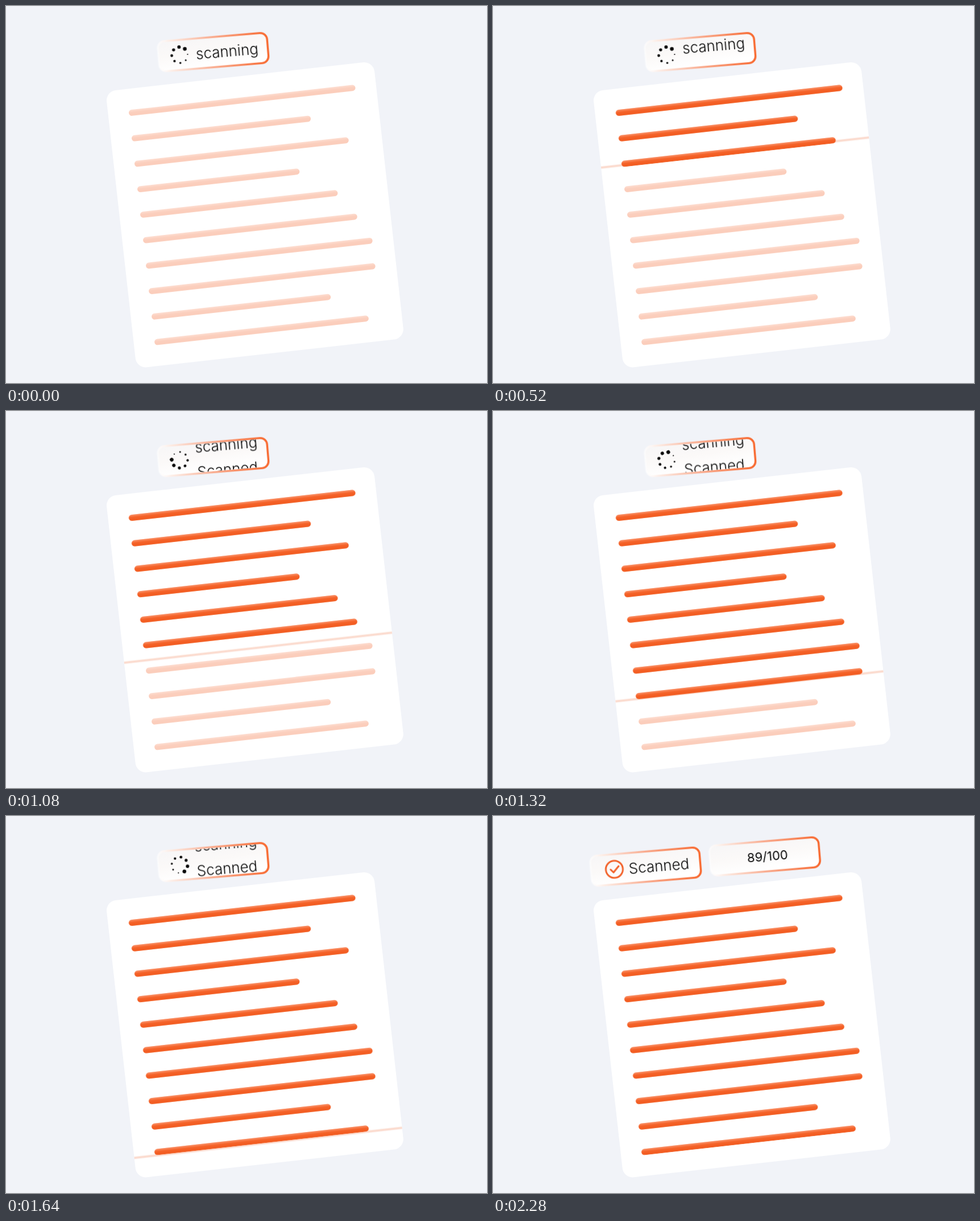
Recreate the animation shown at these times as an HTML page without scripts. Size 846 by 662 pixels, loop 4000 ms.

```html
<!DOCTYPE html>
<html lang="en">
<head>
<meta charset="utf-8">
<title>Document scan</title>
<style>
  html, body { margin: 0; width: 100%; height: 100%; overflow: hidden; background: #f1f3f8; }
  svg { display: block; width: 846px; height: 662px; }
  text { font-family: Inter, "Open Sans", sans-serif; font-size: 26px; font-weight: 300; fill: #0a0a0a; }
  .score { font-size: 22px; font-weight: 400; text-anchor: middle; }
  .pill { fill: url(#glass); stroke: url(#rim); stroke-width: 3.5; }

  .scan, .old, .new, .spin, .dots, .tick, .status, .result {
    animation: 4s linear infinite;
  }
  .scan { animation-name: scan; }
  .old { animation-name: old; }
  .new { animation-name: new; }
  .spin { animation-name: spin; }
  .dots { animation-name: dots; }
  .tick { animation-name: tick; }
  .status { animation-name: status; }
  .result { animation-name: result; }

  @keyframes scan {
    0% { transform: translateY(0); }
    45%, 100% { transform: translateY(512px); }
  }
  @keyframes old {
    0% { transform: translateY(0); }
    57%, 100% { transform: translateY(-43.5px); }
  }
  @keyframes new {
    0% { transform: translateY(43.5px); }
    19% { transform: translateY(33px); }
    27% { transform: translateY(23px); }
    57%, 100% { transform: translateY(0); }
  }
  @keyframes spin {
    0%, 13% { transform: rotate(0deg); }
    56.5%, 100% { transform: rotate(720deg); }
  }
  @keyframes dots {
    0%, 46% { opacity: 1; }
    55%, 100% { opacity: 0; }
  }
  @keyframes tick {
    0%, 50% { opacity: 0; }
    57%, 100% { opacity: 1; }
  }
  @keyframes status {
    0%, 44% { transform: translate(0, 0); animation-timing-function: ease-in-out; }
    55.5%, 100% { transform: translate(-96px, 8px); }
  }
  @keyframes result {
    0%, 48% { transform: translate(96px, -8px); opacity: 0; }
    56% { transform: translate(30px, -2.5px); opacity: .85; }
    57%, 100% { transform: translate(0, 0); opacity: 1; }
  }
</style>
</head>
<body>
<svg viewBox="0 0 846 662" xmlns="http://www.w3.org/2000/svg">
  <defs>
    <linearGradient id="bar" x2="0" y2="1">
      <stop offset="0" stop-color="#fa946c"/>
      <stop offset=".4" stop-color="#f5652c"/>
      <stop offset=".75" stop-color="#f25b20"/>
      <stop offset="1" stop-color="#f4672e"/>
    </linearGradient>
    <linearGradient id="rim">
      <stop offset="0" stop-color="#fff" stop-opacity=".45"/>
      <stop offset=".1" stop-color="#fdf0ea"/>
      <stop offset=".5" stop-color="#f9ab8e"/>
      <stop offset=".85" stop-color="#f87a49"/>
      <stop offset="1" stop-color="#f8692f"/>
    </linearGradient>
    <linearGradient id="glass" x1="0" y1="0" x2=".25" y2="1">
      <stop offset="0" stop-color="#f7f6f7"/>
      <stop offset=".5" stop-color="#fbf9f8"/>
      <stop offset="1" stop-color="#fff"/>
    </linearGradient>
    <clipPath id="sheet"><rect width="474" height="489.5" rx="18"/></clipPath>
    <clipPath id="read"><rect class="scan" y="-611" width="474" height="600"/></clipPath>
    <clipPath id="window"><rect x="-96" y="-24.6" width="192" height="49.2" rx="10"/></clipPath>

    <g id="bars" fill="url(#bar)">
      <rect x="36.4" y="37.1" width="401" height="10.8" rx="5.4"/>
      <rect x="36.4" y="82.1" width="317" height="10.8" rx="5.4"/>
      <rect x="36.4" y="127.1" width="379" height="10.8" rx="5.4"/>
      <rect x="36.4" y="172.1" width="287" height="10.8" rx="5.4"/>
      <rect x="36.4" y="217.1" width="349.5" height="10.8" rx="5.4"/>
      <rect x="36.4" y="262.1" width="379" height="10.8" rx="5.4"/>
      <rect x="36.4" y="307.1" width="401" height="10.8" rx="5.4"/>
      <rect x="36.4" y="352.1" width="401" height="10.8" rx="5.4"/>
      <rect x="36.4" y="397.1" width="317" height="10.8" rx="5.4"/>
      <rect x="36.4" y="442.1" width="379" height="10.8" rx="5.4"/>
    </g>
    <rect id="pill" class="pill" x="-96.5" y="-26.5" width="193" height="53" rx="12"/>
  </defs>

  <rect width="846" height="662" fill="#f1f3f8"/>

  <g transform="translate(175.1 149.9) rotate(-6.4)">
    <rect width="474" height="489.5" rx="18" fill="#fff"/>
    <use href="#bars" opacity=".3"/>
    <g clip-path="url(#sheet)">
      <rect class="scan" y="-15.4" width="474" height="3.8" fill="#fbdacd"/>
    </g>
    <g clip-path="url(#read)"><use href="#bars"/></g>
  </g>

  <g class="result">
    <g transform="translate(477.8 71) rotate(-4.8)">
      <use href="#pill"/>
      <text class="score" x="5" y="8.2">89/100</text>
    </g>
  </g>

  <g class="status">
    <g transform="translate(364.25 81) rotate(-4.8)">
      <use href="#pill"/>
      <g clip-path="url(#window)">
        <text class="old" x="-30.5" y="9.7">scanning</text>
        <text class="new" x="-29.8" y="9.7">Scanned</text>
      </g>
      <g transform="translate(-59 .1)">
        <g class="dots">
          <g class="spin" fill="#0a0a0a">
            <circle r="3.3" cx="9.9" cy="-9.9"/>
            <circle r="3" cy="-14"/>
            <circle r="2.7" cx="-9.9" cy="-9.9"/>
            <circle r="2.4" cx="-14"/>
            <circle r="2.1" cx="-9.9" cy="9.9"/>
            <circle r="1.8" cy="14"/>
            <circle r="1.5" cx="9.9" cy="9.9"/>
            <circle r="1.1" cx="14"/>
          </g>
        </g>
      </g>
      <g class="tick" fill="none" stroke="#f2622a" stroke-width="3">
        <circle cx="-55" r="15"/>
        <path d="M-61.5 0l4.6 5.4 9.8-10.3" stroke-linecap="round" stroke-linejoin="round"/>
      </g>
    </g>
  </g>
</svg>
</body>
</html>
```
